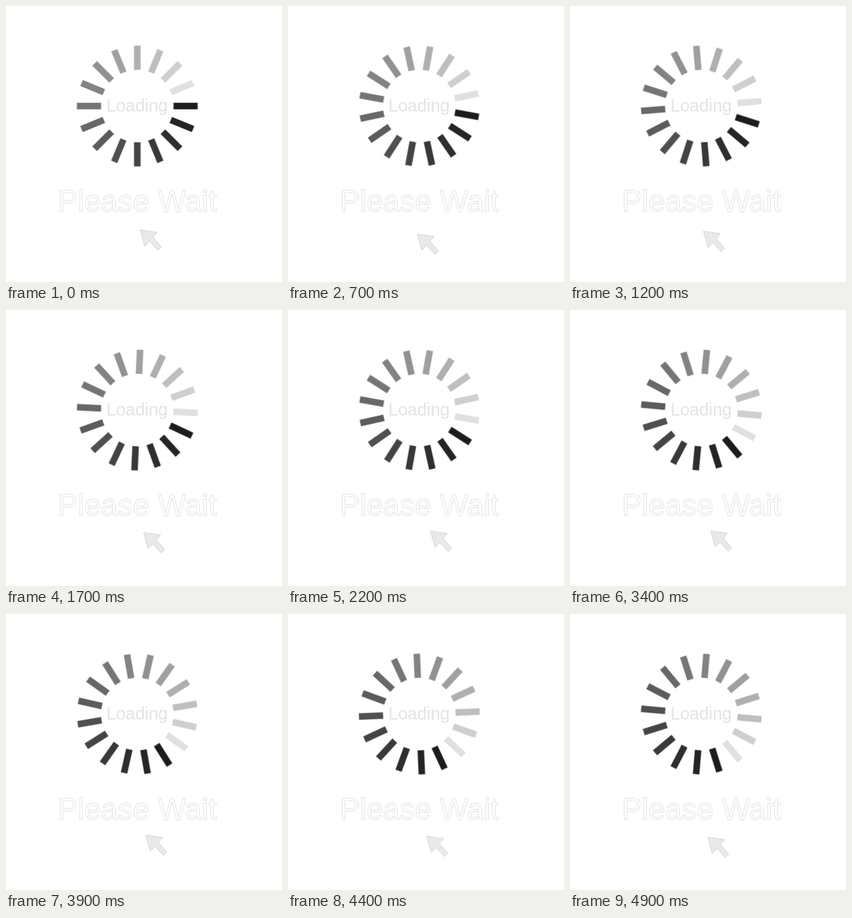
Write an HTML page without scripts that moves like this. It is 400x400 px and loops after 5000 ms.

```html
<!DOCTYPE html>
<html lang="en">
<head>
<meta charset="utf-8">
<title>Please Wait</title>
<style>
  html, body { margin: 0; width: 100%; height: 100%; overflow: hidden; background: #fff; }
  svg { display: block; width: 100%; height: 100%; }

  .wheel { animation: turn 5s steps(50) infinite; }
  .wheel rect {
    --g: calc(28 + 9 * var(--n) + .27 * var(--n) * var(--n));
    x: 52.5px; y: -4.75px; width: 35px; height: 9.5px;
    fill: rgb(var(--g), var(--g), var(--g));
    transform: rotate(calc(var(--n) * 22.5deg));
  }
  @keyframes turn { to { transform: rotate(74deg); } }

  text { font-family: "Liberation Sans", Arial, sans-serif; }
  .loading { font-size: 25px; fill: #e4e4e4; }
  .wait { font-size: 43.5px; fill: #fff; stroke: #e0e0e0; stroke-width: .9px; }

  .cursor { fill: #e9e9e9; stroke: #d6d6d6; stroke-width: 1px; animation: drift 5s infinite; }
  @keyframes drift {
    0%   { transform: translate(194px, 324px); animation-timing-function: steps(7); }
    14%  { transform: translate(187px, 330px); animation-timing-function: steps(10); }
    34%  { transform: translate(199px, 322px); animation-timing-function: steps(5); }
    44%  { transform: translate(206px, 320px); animation-timing-function: steps(6); }
    56%  { transform: translate(205px, 319px); animation-timing-function: steps(11); }
    78%  { transform: translate(202px, 320px); animation-timing-function: steps(10); }
    98%, 100% { transform: translate(199px, 323px); animation-timing-function: steps(1); }
  }
</style>
</head>
<body>
<svg viewBox="0 0 400 400">
  <g transform="translate(190.3 145)">
    <g class="wheel">
      <rect style="--n:0"/><rect style="--n:1"/><rect style="--n:2"/><rect style="--n:3"/>
      <rect style="--n:4"/><rect style="--n:5"/><rect style="--n:6"/><rect style="--n:7"/>
      <rect style="--n:8"/><rect style="--n:9"/><rect style="--n:10"/><rect style="--n:11"/>
      <rect style="--n:12"/><rect style="--n:13"/><rect style="--n:14"/><rect style="--n:15"/>
    </g>
  </g>
  <text class="loading" x="145.5" y="153">Loading</text>
  <text class="wait" x="75" y="297.5">Please Wait</text>
  <path class="cursor" d="M.5 .5 L25 4 L19 11 L31 25 L26 30 L14 17 L7 24 Z"/>
</svg>
</body>
</html>
```
